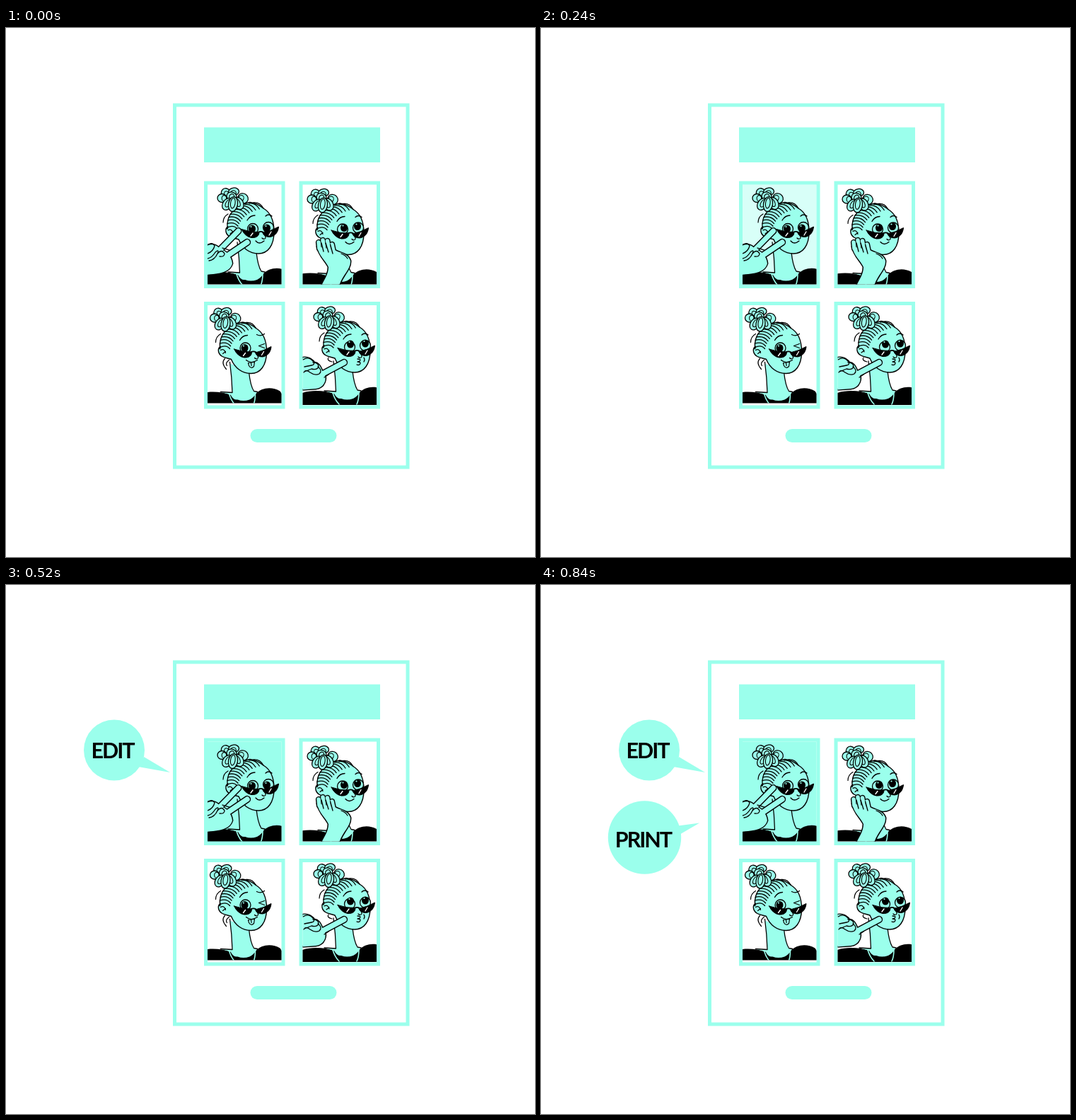
Animation, 748 px wide and 748 px high, one loop 1520 ms. Source, as an HTML page with a canvas:

```html
<!DOCTYPE html>
<html lang="en">
<head>
<meta charset="utf-8">
<title>Photo booth</title>
<style>
html, body { margin: 0; width: 100%; height: 100%; overflow: hidden; background: #fff; }
canvas { display: block; width: 748px; height: 748px; }
</style>
</head>
<body>
<canvas id="stage" width="748" height="748"></canvas>
<script>
const ctx = document.getElementById('stage').getContext('2d');
const MINT = '#9bffec', INK = '#000';
const LOOP = 1520, STEP = 40;

function shape(d, fill, stroke, width = 1.4) {
  const p = new Path2D(d);
  if (fill) { ctx.fillStyle = fill; ctx.fill(p); }
  if (stroke) { ctx.strokeStyle = stroke; ctx.lineWidth = width; ctx.stroke(p); }
}
const line = (d, width = 1.3, color = INK) => shape(d, null, color, width);

function oval(x, y, rx, ry, rot, fill, stroke, width = 1.3) {
  ctx.beginPath();
  ctx.ellipse(x, y, rx, ry, rot, 0, Math.PI * 2);
  if (fill) { ctx.fillStyle = fill; ctx.fill(); }
  if (stroke) { ctx.strokeStyle = stroke; ctx.lineWidth = width; ctx.stroke(); }
}

const box = (x, y, w, h, color) => { ctx.fillStyle = color; ctx.fillRect(x, y, w, h); };
const frame = (x, y, w, h) => {
  ctx.lineJoin = 'miter';
  ctx.strokeStyle = MINT;
  ctx.lineWidth = 5;
  ctx.strokeRect(x + 2.5, y + 2.5, w - 5, h - 5);
  ctx.lineJoin = 'round';
};

function cubic(u, a, b, c, d) {
  const v = 1 - u;
  return v * v * v * a + 3 * v * v * u * b + 3 * v * u * u * c + u * u * u * d;
}

// Palm and fingers share one outline.
function hand(palm, fingers, details) {
  for (const [color, extra] of [[INK, 2.8], [MINT, 0]]) {
    if (extra) shape(palm, null, INK, extra);
    for (const [x1, y1, x2, y2, w] of fingers) {
      line(`M${x1},${y1}L${x2},${y2}`, w + extra, color);
    }
    if (!extra) shape(palm, MINT);
  }
  line(details);
}

function body() {
  shape('M260,380L270,355C284,343 310,343 328,349L363,348C372,339 386,337 398,344L420,380Z', INK);
  shape('M327,305L331,346Q322,346 314,345L328,349Q332,357 338,356Q346,359 355,356Q361,353 365,346L360,344Q356,333 354,314Z', MINT);
  line('M327,303Q330,325 330.5,346L314,345M354,317Q356,336 361,344L366,345');
  line('M326,348Q329,358 335,364M363,347Q363,358 360,364', 1.6, MINT);
}

function bun() {
  const lobes = [
    [311, 233.5, 6.5, 7, -.7], [322, 231.5, 7.5, 5.5, -.1], [305.5, 240.5, 6.5, 6, 0],
    [335, 241, 7.5, 7, .6], [319, 238, 7, 6, .3], [313, 249, 6.5, 9, .6],
    [329, 248, 6.5, 9, -.5], [321, 249, 6.5, 10.5, .15]
  ];
  const mix = (a, b) => a + (b - a) * .2;
  for (const [x, y, rx, ry, rot] of lobes) {
    oval(x, y, rx, ry, rot, MINT, INK);
    oval(mix(x, 320), mix(y, 242), rx * .5, ry * .7, rot, null, INK, 1.1);
  }
}

function head() {
  shape('M313,284C311,262 326,250 345,246.5Q356,248 364,255C376,262 379,276 379,288C379,308 370,319 357,319C344,319 334,311 329,299C324,297 313,297 311,288Q310,283 314,281Z', MINT, INK);
  for (let i = 0; i <= 11; i++) {
    const u = i / 11;
    const x1 = cubic(u, 313, 311, 326, 350), y1 = cubic(u, 282, 262, 250, 247);
    const x2 = cubic(u, 327, 330, 342, 364), y2 = cubic(u, 284, 270, 258, 255);
    line(`M${x1},${y1}Q${(x1 + x2) / 2 + 2},${(y1 + y2) / 2 - 5} ${x2},${y2}`);
  }
  line('M314,263Q307,267 307,275M314,286Q319,283 321,290M317,291L321,288', 1.2);
  bun();
}

function glasses() {
  line('M357,288.5Q361,287 364,289', 1.8);
  shape('M333,284.5Q345,289 358,288.5C358,294 354,297 347,296.5Q338,295 333,284.5Z', INK, INK, 1);
  shape('M363,289.5Q375,287 385.5,281C385,288 381,294.5 373,295.5Q365,295.5 363,289.5Z', INK, INK, 1);
  line('M346,294L349,290M372,293L375,288', 1.4, '#fff');
}

function eye(x, y, px, py) {
  oval(x, y, 7.5, 7.5, 0, MINT, INK);
  oval(px, py, 5, 5.5, 0, INK);
  oval(px - 1.5, py - 3, 1.1, 1.1, 0, MINT);
}

const brows = 'M341,272Q345,265 352,265M367,266Q371,262 376,266';
const nose = 'M364,291Q369,296 366,298Q364,299 362,297';
const smile = 'M353,301Q358,307 365,301';

const people = [
  {
    x: 280, y: 216.5, bottom: 362.5, dx: 0, dy: 0,
    face() {
      eye(349, 284, 348, 284);
      eye(371, 282, 369, 283);
      line(brows + nose + smile);
    },
    extra() {
      hand('M278,311C288,303 298,306 303,313C312,315 319,323 320,333C317,344 306,348 278,349Z',
        [[302, 314, 328.5, 287, 7], [310, 324, 341, 303, 7.5]],
        'M285,307Q292,302 295,308Q293,316 285,319M285,326Q291,325 296,317Q302,312 299,319Q295,328 287,329M299,319Q305,312 309,319Q309,324 302,323M306,311Q313,313 316,314');
    }
  },
  {
    x: 414.5, y: 216.5, bottom: 362.5, dx: 127, dy: 1.5,
    face() {
      eye(349, 283, 351, 281);
      eye(371, 281, 370, 279);
      line(brows + nose + smile);
    },
    extra() {
      hand('M440,309C442,322 452,329 456,338C456,348 450,356 444,368L470,368C474,350 488,342 487,329C484,319 472,318 465,314Z',
        [[443, 312, 442, 303, 5.5], [450, 314, 448, 300, 5.5], [457, 316, 454.5, 301, 5.5], [464, 320, 461, 306, 5.5]],
        'M446,304L449,316M452,304L456,317M458.5,306L462,319M474,319Q480,321 483,326');
    }
  },
  {
    x: 280, y: 387, bottom: 530.5, dx: -10.5, dy: 169.5,
    face() {
      eye(349, 283, 348, 283);
      line('M341,272Q345,265 352,265M365,264Q371,267 376,263M376,277L368,280L376,283' + nose);
      shape('M353,304L354,308Q357,313 361,309L362,303Z', MINT, INK, 1.2);
      line('M350,300Q357,306 366,300M357,304L357.5,308', 1.2);
      line('M320,298Q314,304 322,313M326,300Q320,304 323,308', 1.2);
    }
  },
  {
    x: 414.5, y: 387, bottom: 533, dx: 136, dy: 168,
    face() {
      eye(350, 283, 351, 279);
      eye(372, 281, 372, 278);
      line(brows + nose + 'M361,300Q367,300 364,303L361,304Q367,304 364,308Q362,309 360,308M370,298Q372,301 370,304');
      line('M320,298Q317,302 325,304', 1.2);
    },
    extra() {
      hand('M412,470C422,462 432,467 436,473C444,474 445,481 448,486C456,495 450,509 438,510L412,512Z',
        [[446, 490, 478, 473, 7.5]],
        'M420,469Q428,464 434,471Q438,476 432,477L422,479M434,473Q442,473 442,479Q440,484 432,482L422,486M441,479Q448,484 443,489Q437,492 430,487Q424,482 421,487M450,494L456,490');
    }
  }
];

function portrait(p, flash) {
  frame(p.x, p.y, 114.5, 151.5);
  ctx.save();
  ctx.beginPath();
  ctx.rect(p.x + 5, p.y + 5, 104.5, 141.5);
  ctx.clip();
  if (flash) {
    ctx.globalAlpha = flash;
    box(p.x + 4, p.y + 4, 107, 144, MINT);
    ctx.globalAlpha = 1;
  }
  ctx.beginPath();
  ctx.rect(p.x, p.y, 114.5, p.bottom - p.y);
  ctx.clip();
  ctx.save();
  ctx.translate(p.dx, p.dy);
  body();
  head();
  p.face();
  glasses();
  ctx.restore();
  if (p.extra) p.extra();
  ctx.restore();
}

// Each bubble grows out of the tip of its tail.
const bubbles = [
  { text: 'EDIT', start: 360, sizes: [.75, 1.074, 1.035, 1.01, 1], tip: [232, 265], x: 153, y: 233.5, r: 43,
    tail: 'M195,243L232,265L187,257Z', tx: 151.5, ty: 245 },
  { text: 'PRINT', start: 720, sizes: [.832, 1.1, 1.045, 1], tip: [224, 336.5], x: 146.5, y: 357, r: 51.7,
    tail: 'M190,341L224,336.5L194,354Z', tx: 145.5, ty: 371 }
];

function bubble(b, t) {
  if (t < b.start) return;
  const i = Math.min(Math.floor((t - b.start) / STEP), b.sizes.length - 1);
  const [px, py] = b.tip;
  ctx.save();
  ctx.translate(px, py);
  ctx.scale(b.sizes[i], b.sizes[i]);
  ctx.translate(-px, -py);
  oval(b.x, b.y, b.r, b.r, 0, MINT);
  shape(b.tail, MINT);
  ctx.font = '700 30.5px Lato, Inter, sans-serif';
  ctx.letterSpacing = '-2px';
  ctx.textAlign = 'center';
  ctx.fillStyle = INK;
  ctx.fillText(b.text, b.tx - 1, b.ty);
  ctx.restore();
}

function flashAt(t) {
  if (t < 120) return 0;
  return t > 340 ? 1 : .5 + .5 * Math.cos((t - 200) / 140 * Math.PI * 2);
}

function draw(t) {
  box(0, 0, 748, 748, '#fff');
  ctx.lineCap = ctx.lineJoin = 'round';
  frame(236, 106.5, 334.5, 517);
  box(280, 140.5, 249, 49.5, MINT);
  people.forEach((p, i) => portrait(p, i ? 0 : flashAt(t)));
  ctx.fillStyle = MINT;
  ctx.beginPath();
  ctx.roundRect(345.5, 567, 122, 19, 9.5);
  ctx.fill();
  bubbles.forEach(b => bubble(b, t));
}

const origin = performance.now();
function tick() {
  const t = (performance.now() - origin) % LOOP;
  draw(Math.floor(t / STEP) * STEP);
  requestAnimationFrame(tick);
}
tick();
</script>
</body>
</html>
```
